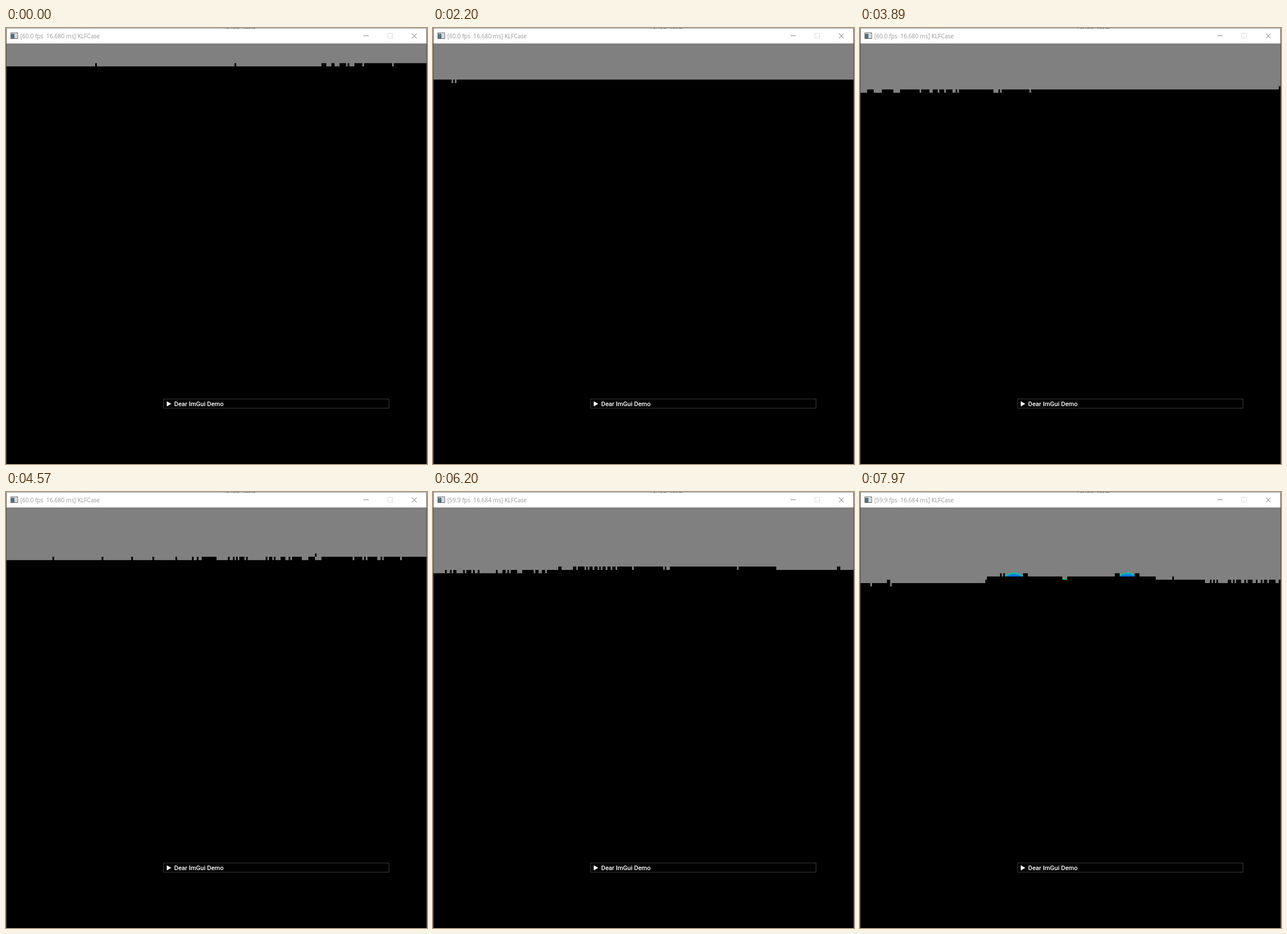
These frames come from a looping animation (736 by 761 pixels, 8000 ms). An HTML page with a canvas:

```html
<!DOCTYPE html>
<html lang="en">
<head>
<meta charset="utf-8">
<title>Tile renderer</title>
<style>
  html, body { margin: 0; width: 100%; height: 100%; overflow: hidden; background: #000; }
  canvas { display: block; }
</style>
</head>
<body>
<canvas id="stage" width="736" height="761"></canvas>
<script>
const LOOP = 8000, COLS = 256, FIRST_ROW = 6, LAST_ROW = 23;
const SIZE = 1024, TILE_W = 4, TILE_H = 8;

const stage = document.getElementById('stage').getContext('2d');
const view = document.createElement('canvas');
view.width = view.height = SIZE;
const scene = view.getContext('2d');

// Each object's apex sits at (col, row); half is the half-width of its visible cap in tiles.
const OBJECTS = [
  { col: 93, row: 20, half: 6, top: 158, radius: 35, core: '#0878ec', rim: '#20b4a4' },
  { col: 162, row: 20, half: 5, top: 158, radius: 35, core: '#0878ec', rim: '#20b4a4' },
  { col: 124, row: 21, half: 2, top: 174, radius: 16, core: '#00dc90', rim: '#00dc90' }
];

const FRAME_MS = [16.680, 16.681, 16.680, 16.679, 16.680, 16.680, 16.684, 16.680, 16.684];

function random(a, b) {
  const v = Math.sin(a * 127.1 + b * 311.7) * 43758.5453;
  return v - Math.floor(v);
}

function rowStart(row) {
  const bump = row > 9 && row < 18 ? 130 * Math.sin(Math.PI * (row - 9) / 9) : 0;
  return 1090 + 485 * (row - 9) + bump;
}

// Tiles near objects trace more rays and take longer.
function objectDelay(row, col) {
  for (const o of OBJECTS) {
    const distance = Math.abs(col - o.col);
    if (row === o.row && distance < o.half) return 500;
    if (row === o.row && distance < o.half + 3) return 1350;
    if (row === o.row - 1 && distance < o.half + 5) return 950;
  }
  if (row > 20 && Math.abs(col - 128) < 52) return 950;
  return row > 16 && Math.abs(col - 142) < 67 ? 450 : 0;
}

function finishTime(row, col) {
  const lag = row < 14 ? 120 : row < 17 ? 450 : 400;
  const noise = 0.6 * random(row, col) + 0.4 * random(row + 50, col >> 2);
  const straggler = random(row + 90, col >> 1) > 0.97 ? 380 * noise : 0;
  return rowStart(row) + 380 * col / COLS + lag * noise + straggler + objectDelay(row, col);
}

const finish = [];
for (let row = FIRST_ROW; row <= LAST_ROW; row++) {
  finish[row] = Array.from({ length: COLS }, (_, col) => finishTime(row, col));
}

function box(ctx, color, x, y, w, h) {
  ctx.fillStyle = color;
  ctx.fillRect(x, y, w, h);
}

function stroke(color, ...lines) {
  stage.strokeStyle = color;
  stage.beginPath();
  for (const [x1, y1, x2, y2] of lines) {
    stage.moveTo(x1, y1);
    stage.lineTo(x2, y2);
  }
  stage.stroke();
}

function outline(color, x, y, w, h) {
  stage.strokeStyle = color;
  stage.strokeRect(x + 0.5, y + 0.5, w, h);
}

function label(text, x, y, font, color) {
  stage.font = font;
  stage.fillStyle = color;
  stage.fillText(text, x, y);
}

function drawObject({ col, top, radius, core, rim }) {
  const x = (col + 0.5) * TILE_W, y = top + radius;
  const shade = scene.createRadialGradient(x, y, 0, x, y, radius);
  shade.addColorStop(0.84, core);
  shade.addColorStop(0.92, rim);
  scene.fillStyle = shade;
  scene.beginPath();
  scene.arc(x, y, radius, 0, 2 * Math.PI);
  scene.fill();
}

function drawRender(t) {
  const bottom = (LAST_ROW + 1) * TILE_H;
  box(scene, '#808080', 0, 0, SIZE, bottom);
  OBJECTS.forEach(drawObject);
  box(scene, '#000', 0, bottom, SIZE, SIZE - bottom);
  finish.forEach((times, row) => times.forEach((end, col) => {
    if (end > t) box(scene, '#000', col * TILE_W, row * TILE_H, TILE_W, TILE_H);
  }));
  stage.drawImage(view, 1, 27, 734, 734);
}

function drawWindow(t) {
  box(stage, '#fff', 0, 0, 736, 27);
  box(stage, '#a0a0a0', 0, 0, 736, 1);
  label('render tests', 380, 1, '10px "Open Sans", sans-serif', '#333');
  box(stage, '#fff', 1, 1, 734, 3);
  box(stage, '#505050', 0, 1, 1, 760);
  box(stage, '#505050', 735, 1, 1, 760);

  outline('#606060', 8, 8, 12, 10);
  box(stage, '#527580', 9, 10, 6, 8);
  box(stage, '#c8d0d2', 16, 10, 3, 8);

  const ms = FRAME_MS[Math.floor((t + 690) / 1000)];
  label(`[${(1000 / ms).toFixed(1)} fps  ${ms.toFixed(3)} ms] KLFCase`, 25, 18,
    '10.1px "Open Sans", sans-serif', '#999');

  stroke('#888', [625, 13.5, 634, 13.5]);
  outline('#ddd', 667, 9, 8, 8);
  stroke('#777', [709.5, 9.5, 718, 18], [718, 9.5, 709.5, 18]);
}

function drawPanel() {
  outline('#37373f', 275, 647, 394, 16);
  stage.fillStyle = '#fff';
  stage.beginPath();
  stage.moveTo(281, 651.5);
  stage.lineTo(289, 656);
  stage.lineTo(281, 660.5);
  stage.fill();
  label('Dear ImGui Demo', 294, 660, '500 11px Roboto, sans-serif', '#fff');
}

const origin = performance.now();
function tick() {
  const t = (performance.now() - origin) % LOOP;
  drawRender(t);
  drawWindow(t);
  drawPanel();
  requestAnimationFrame(tick);
}
tick();
</script>
</body>
</html>
```
